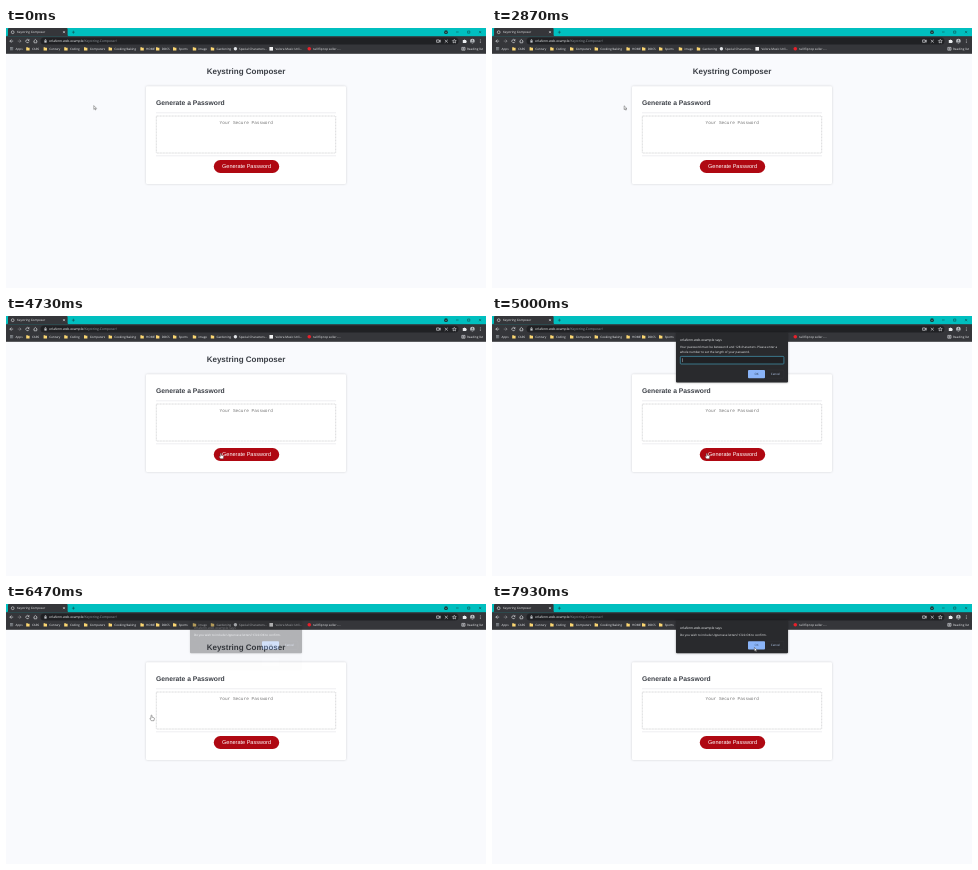
These frames come from a looping animation (480 px wide and 260 px high, 8 s). An HTML page:

```html
<!DOCTYPE html>
<html lang="en">
<head>
<meta charset="utf-8">
<title>Keystring Composer</title>
<style>
  html, body { margin: 0; width: 100%; height: 100%; overflow: hidden; background: #f9fafd; }
  svg { display: block; width: 480px; height: 260px; }
  text { text-rendering: geometricPrecision; white-space: pre; }
  .ui { font-family: "Open Sans", "Noto Sans", sans-serif; font-size: 3px; fill: #f1f3f4; }
  .page { font-family: "Liberation Sans", Arial, sans-serif; fill: #3b3f46; }
  .mono { font-family: "Liberation Mono", "Courier New", monospace; font-size: 4.45px; fill: #757575; }
  .bold { font-weight: 700; }
  .mid { text-anchor: middle; }
  .line { fill: none; stroke: #e2e3e6; stroke-width: .6; }
  .icon { fill: none; stroke: #e3e5e8; stroke-width: .6; }
  .glyph { fill: none; stroke: #143c3e; stroke-width: .5; }
  .pointer { fill: #fff; stroke: #333; stroke-width: .4; stroke-linejoin: round; }
  .card { filter: drop-shadow(0 .5px 1.2px rgba(0, 0, 0, .17)); }
  .dialog { filter: drop-shadow(0 .5px 1px rgba(0, 0, 0, .35)); }
</style>
</head>
<body>
<svg viewBox="0 0 480 260">
  <rect width="480" height="260" fill="#f9fafd"/>

  <!-- tab strip -->
  <rect width="480" height="9" fill="#00bfbf"/>
  <path d="M1 8.2Q2 8 2 7V1Q2 0 3 0H60.6Q61.6 0 61.6 1V7Q61.6 8 62.6 8.2Z" fill="#35363a"/>
  <circle class="icon" cx="6.7" cy="4.2" r="1.4" stroke-width=".5"/>
  <text class="ui" x="11" y="5.2">Keystring Composer</text>
  <path class="icon" d="M57 3.1l2 2m0-2l-2 2"/>
  <path class="glyph" d="M65.9 4.2h3m-1.5-1.5v3M450 4h2.6M461.6 3h2.2v2.2h-2.2ZM473 3l2.2 2.2m0-2.2L473 5.2"/>
  <circle cx="440" cy="4.2" r="1.9" fill="#17383a"/>
  <path d="M439.2 3.8l.8.9.8-.9" fill="none" stroke="#cff" stroke-width=".4"/>

  <!-- toolbar -->
  <rect y="8.2" width="480" height="17.6" fill="#35363a"/>
  <rect x="34.5" y="9.5" width="418" height="7" rx="3.5" fill="#202124"/>
  <path class="icon" d="M7.2 13.1H3.8m1.6-1.6L3.8 13.1l1.6 1.6"/>
  <path class="icon" stroke-opacity=".5" d="M11.7 13.1h3.4m-1.6-1.6l1.6 1.6-1.6 1.6"/>
  <path class="icon" d="M22.8 12.2a1.6 1.6 0 1 0 .2 1.4M23 11.2v1.3h-1.3"/>
  <path class="icon" d="M27.5 13.2l1.9-1.7 1.9 1.7M28.1 12.9v1.9h2.6v-1.9"/>
  <rect x="38.4" y="12.7" width="2.2" height="1.9" fill="#c4c7cc"/>
  <path class="icon" stroke-width=".4" d="M38.9 12.8v-.6a.6.6 0 0 1 1.2 0v.6"/>
  <text class="ui" x="43" y="14.2" style="font-size:3.3px">orlafenn.web.example<tspan fill="#9aa0a6">/Keystring-Composer/</tspan></text>
  <path class="icon" d="M430.6 11.9h2.6v2.4h-2.6ZM433.2 12.7l1.1-.7v2.2l-1.1-.7M438.8 11.8l3 2.8m0-2.8l-3 2.8"/>
  <path class="icon" stroke-width=".45" d="M448.3 11.3l.6 1.2 1.3.2-.9.9.2 1.3-1.2-.6-1.2.6.2-1.3-.9-.9 1.3-.2Z"/>
  <path d="M456.8 12h1.1a.6.6 0 0 1 1.2 0h1.1v1.1a.6.6 0 0 1 0 1.2v.8h-3.4Z" fill="#eceef0"/>
  <circle cx="466.4" cy="13.1" r="2.3" fill="#c9ccd0"/>
  <circle cx="466.4" cy="12.3" r=".8" fill="#55585d"/>
  <path d="M464.8 14.7a1.6 1.3 0 0 1 3.2 0Z" fill="#55585d"/>
  <path d="M474.4 11.5v.7m0 .6v.7m0 .6v.7" stroke="#e3e5e8" stroke-width=".7"/>

  <g id="marks"></g>
  <path class="icon" stroke-width=".5" d="M455.8 19.4h3.2v2.8h-3.2ZM456.6 20.4h1.6m-1.6.9h1.6"/>
  <text class="ui" x="461" y="21.8">Reading list</text>

  <!-- page -->
  <text class="page bold mid" x="240" y="45.6" font-size="8">Keystring Composer</text>
  <rect class="card" x="140" y="58.3" width="200" height="97.7" rx="1.2" fill="#fff"/>
  <text class="page bold" x="150" y="77.1" font-size="6.75">Generate a Password</text>
  <path class="line" d="M150 84.8H330M150 127.8H330"/>
  <rect x="150.3" y="88" width="179.4" height="37" rx=".6" fill="#fff" stroke="#b0b2b5" stroke-width=".5" stroke-dasharray="1 .5"/>
  <text class="mono mid" x="240.2" y="96.2">Your Secure Password</text>
  <rect x="207.8" y="132" width="65.4" height="13" rx="6.5" fill="#af0812"/>
  <text class="page mid" x="240.5" y="140.3" font-size="5.55" style="fill:#fff">Generate Password</text>

  <!-- dialogs -->
  <g id="ask" class="dialog" opacity="0">
    <rect x="184" y="16.6" width="112" height="49.8" rx="1" fill="#292a2d"/>
    <text class="ui" x="188" y="31.9">Your password must be between 8 and 128 characters. Please enter a</text>
    <text class="ui" x="188" y="36.9">whole number to set the length of your password.</text>
    <rect x="188.3" y="40.4" width="103.6" height="7.6" rx=".8" fill="#202124" stroke="#4299b4" stroke-width=".7"/>
    <text class="ui" id="typed" x="190" y="45.3"></text>
    <rect id="caret" x="190" y="42.3" width=".4" height="3.8" fill="#e8eaed"/>
  </g>
  <g id="confirm" class="dialog" opacity="0">
    <rect x="184" y="16.6" width="112" height="32.6" rx="1" fill="#292a2d"/>
    <text class="ui" x="188" y="31.9">Do you wish to include Uppercase letters? Click OK to confirm.</text>
  </g>

  <g id="cursor">
    <path class="pointer" id="arrow" d="M0 0V3.8L.9 3 1.6 4.4 2.2 4.1 1.6 2.8H2.8Z"/>
    <path class="pointer" id="hand" d="M-.5 3.2V.4a.5.5 0 0 1 1 0V2l2 .5q.5.2.4.8L2.5 5.5H-.3L-1.6 3.6q-.1-.7.5-.6Z"/>
    <path id="beam" d="M-.7-2.2H.7M0-2.2V2.2M-.7 2.2H.7" fill="none" stroke="#444" stroke-width=".4"/>
  </g>
</svg>
<script>
const LOOP = 8000, STEP = 200 / 3;
const NS = "http://www.w3.org/2000/svg";
const $ = id => document.getElementById(id);

function add(parent, tag, attrs, text = "") {
  const el = document.createElementNS(NS, tag);
  for (const key in attrs) el.setAttribute(key, attrs[key]);
  el.textContent = text;
  parent.append(el);
  return el;
}

function label(parent, x, y, text, attrs = {}) {
  return add(parent, "text", { class: "ui", x, y, ...attrs }, text);
}

// Bookmark bar
const marks = $("marks");
const folders = [
  [20.2, "CARS"], [37.6, "Century"], [58.2, "Coding"], [78, "Computers"],
  [102.6, "Cooking/baking"], [134.4, "HOME"], [150, "DOCS"],
  [167, "Sports"], [186.8, "image"], [204.8, "Gardening"]
];
for (let i = 0; i < 9; i++) {
  add(marks, "rect", { x: 4.2 + i % 3 * 1.1, y: 19.3 + Math.floor(i / 3) * 1.1, width: .7, height: .7, fill: "#c6cdd4" });
}
label(marks, 9.6, 21.8, "Apps");
for (const [x, name] of folders) {
  add(marks, "path", { d: `M${x} 19.2h1.4l.5.5h1.5v2.8h-3.4Z`, fill: "#fbd672" });
  label(marks, x + 5.7, 21.8, name);
}
add(marks, "circle", { cx: 229.4, cy: 20.8, r: 1.7, fill: "#e2e5e8" });
label(marks, 233, 21.8, "Special Characters...");
add(marks, "rect", { x: 263.4, y: 19, width: 3.6, height: 3.6, fill: "#f2f2f2" });
label(marks, 269.6, 21.8, "Velora Music Unli...");
add(marks, "circle", { cx: 303.3, cy: 20.8, r: 1.8, fill: "#e8202a" });
label(marks, 307.2, 21.8, "tall flip top seller -...");

// Shared dialog parts
function dress(box, top) {
  label(box, 188, 24.7, "orlafenn.web.example says", { style: "font-size:3.3px" });
  add(box, "rect", { x: 256, y: top, width: 17, height: 8.2, rx: .9, fill: "#8ab4f8" });
  const ok = label(box, 264.5, top + 5.2, "OK", { class: "ui mid", style: "fill:#26384f" });
  add(box, "rect", { x: 274.8, y: top, width: 17, height: 8.2, rx: .9, fill: "none", stroke: "#3a3c40", "stroke-width": .3 });
  label(box, 283.4, top + 5.2, "Cancel", { class: "ui mid", style: "fill:#b9cff3" });
  return ok;
}
dress($("ask"), 54);
const confirmOk = dress($("confirm"), 37.2);

// Tracks: time followed by values
const path = [
  [0, 87.8, 77.6], [2533, 87.8, 77.6], [2867, 132.2, 77.8], [3333, 184, 96],
  [3400, 184, 96], [3600, 196, 101], [4267, 196, 101], [4733, 214.8, 137.3],
  [5200, 214.8, 137.3], [5333, 197, 131], [5533, 197, 131], [5733, 145.5, 111.2],
  [7267, 145.5, 111.2], [7933, 262.4, 43.4], [LOOP, 262.4, 43.4]
];
const askFade = [[0, 0], [4800, 0], [5000, 1], [6333, 1], [6467, 0], [LOOP, 0]];
const confirmFade = [[0, 0], [6400, 0], [6600, 1], [LOOP, 1]];

function sample(track, t) {
  const i = Math.max(1, track.findIndex(key => key[0] >= t));
  const [t0, ...from] = track[i - 1], [t1, ...to] = track[i];
  const k = (t - t0) / (t1 - t0);
  return from.map((v, n) => v + (to[n] - v) * k);
}

function pointerKind(x, y, t) {
  if (t > 4800) return x > 184 && y < 49 ? "arrow" : "hand";
  if (x > 150 && y > 88 && y < 125) return "beam";
  return y > 132 ? "hand" : "arrow";
}

function draw(now) {
  const t = Math.floor((now % LOOP + 4) / STEP) * STEP;
  const [x, y] = sample(path, t);
  const kind = pointerKind(x, y, t);
  $("cursor").setAttribute("transform", `translate(${x} ${y})`);
  for (const id of ["arrow", "hand", "beam"]) $(id).style.display = id === kind ? "" : "none";

  $("ask").setAttribute("opacity", sample(askFade, t)[0]);
  $("confirm").setAttribute("opacity", sample(confirmFade, t)[0]);
  confirmOk.setAttribute("opacity", kind === "arrow" && t > 7800 ? .75 : 1);

  const value = "10".slice(0, t < 6130 ? 0 : t < 6195 ? 1 : 2);
  $("typed").textContent = value;
  $("caret").setAttribute("x", 190 + value.length * 1.72);
  $("caret").style.display = t > 5330 && t < 5860 ? "none" : "";
}

const start = performance.now();
function tick() {
  draw(performance.now() - start);
  requestAnimationFrame(tick);
}
tick();
</script>
</body>
</html>
```
